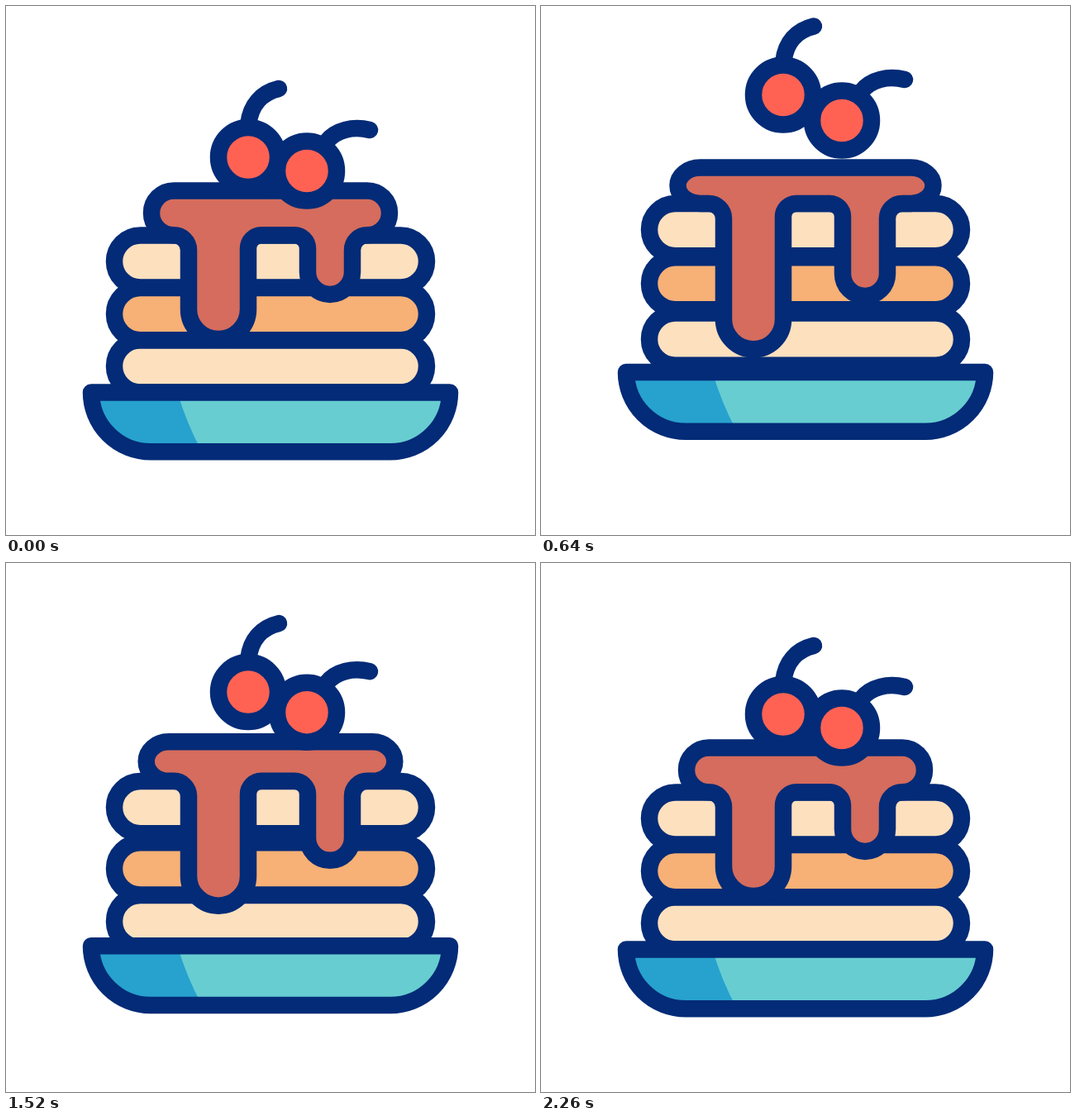
An HTML page with a canvas that plays this animation: 640 px wide and 640 px high, repeating every 3.6 s.

```html
<!DOCTYPE html>
<html lang="en">
<head>
<meta charset="utf-8">
<title>Pancakes</title>
<style>
html, body { margin: 0; width: 100%; height: 100%; overflow: hidden; background: #fff; }
canvas { display: block; width: 100vw; height: 100vh; object-fit: contain; }
</style>
</head>
<body>
<canvas id="stage" width="640" height="640"></canvas>
<script>
const ctx = document.getElementById('stage').getContext('2d');
const LOOP = 3600, STEP = 20;
const INK = '#032b77', CREAM = '#fde0be', GOLD = '#f7b075', SYRUP = '#d56c5d',
  CHERRY = '#ff6253', TEAL = '#67cdd1', BLUE = '#27a1ce';

// Each track: start time, then [duration, height] for every hop.
const HOPS = {
  plate:  [0,   [800, 38.4], [592, 20], [380, 4.8]],
  bottom: [80,  [800, 38.8], [592, 19], [380, 4.8]],
  middle: [160, [800, 38.4], [582, 19], [380, 4.8]],
  top:    [240, [800, 38.4], [600, 21], [380, 4.8]],
  left:   [300, [780, 76.8], [604, 34], [380, 4]],
  right:  [352, [772, 65.2], [600, 21], [380, 2]]
};

function lift(name, t) {
  const [start, ...hops] = HOPS[name];
  t -= start;
  if (t < 0) return 0;
  for (const [len, height] of hops) {
    if (t < len) return -4 * height * t * (len - t) / (len * len);
    t -= len;
  }
  return 0;
}

function pulse(t, start, len) {
  const u = (t - start) / len;
  return u > 0 && u < 1 ? Math.sin(Math.PI * u) ** 2 : 0;
}

function draw(d, fill) {
  const path = new Path2D(d);
  if (fill) {
    ctx.fillStyle = fill;
    ctx.fill(path);
  }
  ctx.stroke(path);
}

function at(dy, paint) {
  ctx.save();
  ctx.translate(0, dy);
  paint();
  ctx.restore();
}

function pancake(y, fill) {
  const r = 31.6;
  draw(`M${131 + r} ${y - r}H${509 - r}a${r} ${r} 0 0 1 0 ${2 * r}H${131 + r}a${r} ${r} 0 0 1 0 ${-2 * r}Z`, fill);
}

function plate() {
  const d = 'M103 467.5H537A72 72 0 0 1 465 539.3H175A72 72 0 0 1 103 467.5Z';
  ctx.fillStyle = TEAL;
  ctx.fill(new Path2D(d));
  ctx.fillStyle = BLUE;
  ctx.fill(new Path2D('M103 467.5H207.5Q218 504 237 539.3H175A72 72 0 0 1 103 467.5Z'));
  draw(d);
}

// The pool flattens and widens while its drips grow.
function syrup(long, short) {
  const flat = short * 0.26, base = 277.3;
  const h = 53.8 - flat, ry = h / 2, rx = 27;
  const x0 = 176 - flat, x1 = 464 + flat;
  draw(`M${x0 + rx} ${base - h}H${x1 - rx}a${rx} ${ry} 0 0 1 0 ${h}H437
    A18 18 0 0 0 419 ${base + 18}V${322 + short}a27 27 0 0 1 -54 0V${base + 16}
    a16 16 0 0 0 -16 -16H309a16 16 0 0 0 -16 16V${367 + long}a36 36 0 0 1 -72 0
    V${base + 18}A18 18 0 0 0 203 ${base}H${x0 + rx}a${rx} ${ry} 0 0 1 0 ${-h}Z`, SYRUP);
}

function cherry(x, y, stem) {
  draw(stem);
  draw(`M${x - 36} ${y}a36 36 0 1 1 72 0a36 36 0 1 1 -72 0Z`, CHERRY);
}

function render(t) {
  ctx.fillStyle = '#fff';
  ctx.fillRect(0, 0, 640, 640);
  ctx.strokeStyle = INK;
  ctx.lineWidth = 20.5;
  ctx.lineCap = ctx.lineJoin = 'round';

  const first = pulse(t, 370, 690), second = pulse(t, 1150, 570);
  at(lift('bottom', t), () => pancake(435.8, CREAM));
  at(lift('plate', t), plate);
  at(lift('middle', t), () => pancake(372.6, GOLD));
  at(lift('top', t), () => {
    pancake(309, CREAM);
    syrup(57 * first + 31.5 * second, 45.5 * first + 30.5 * second);
  });
  at(lift('left', t), () => cherry(293, 183, 'M293.5 142C296 120 309 105 330 100'));
  at(lift('right', t), () => cherry(364, 199.5, 'M388 164C399 150 420 145 440 150'));
}

const begin = performance.now();
function frame() {
  const t = (performance.now() - begin) % LOOP;
  render(Math.floor(t / STEP) * STEP);
  requestAnimationFrame(frame);
}
frame();
</script>
</body>
</html>
```
